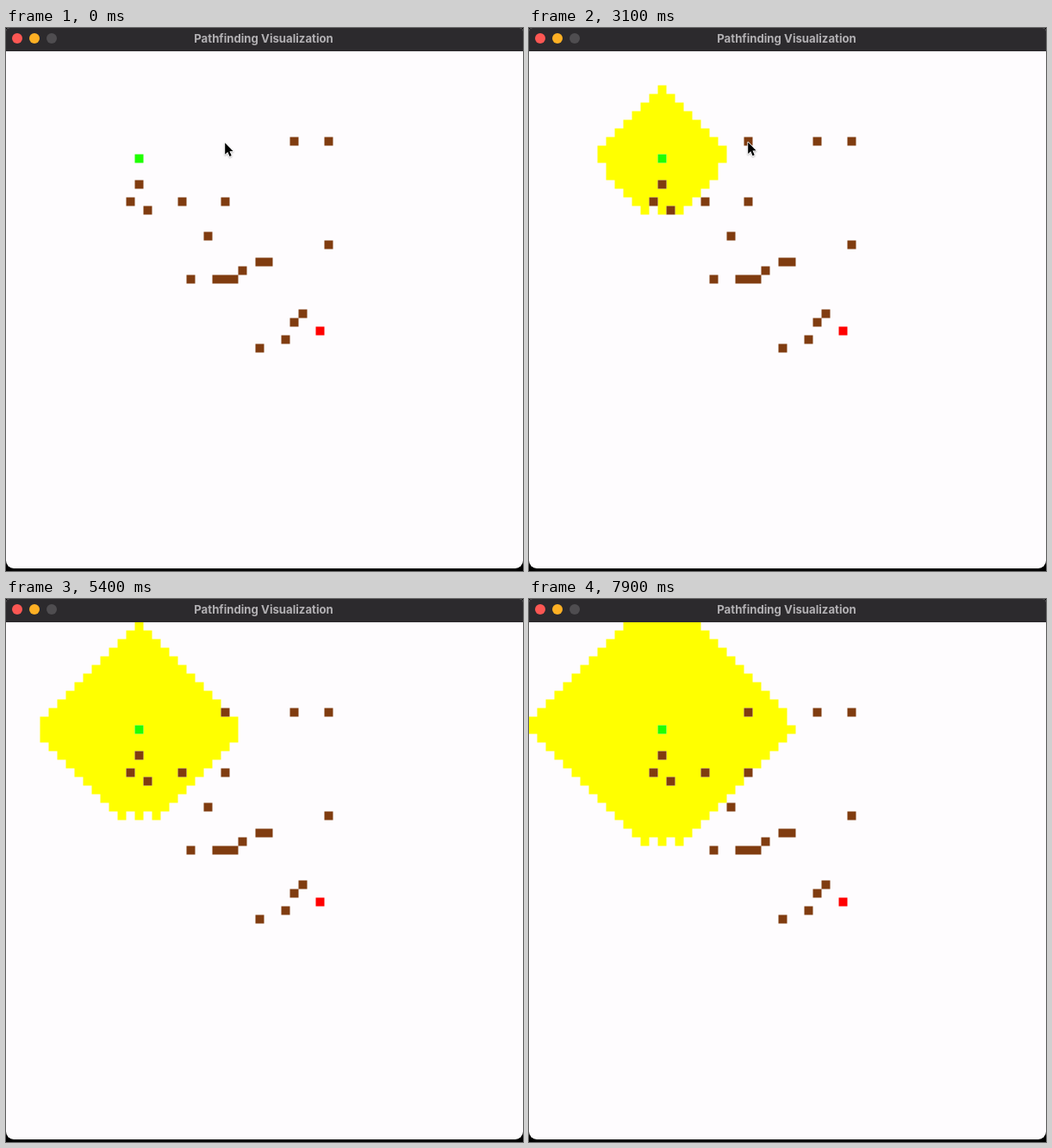
These frames come from a looping animation (600x630 px, 8000 ms). An HTML page with a canvas:

```html
<!DOCTYPE html>
<html lang="en">
<head>
<meta charset="utf-8">
<title>Pathfinding Visualization</title>
<style>
  html, body { margin: 0; width: 100%; height: 100%; overflow: hidden; background: #000; }
  .window { position: absolute; left: 0; top: 0; width: 600px; height: 627px; overflow: hidden;
            border-radius: 4px 4px 9px 9px; background: #fefcfe; }
  .bar { position: absolute; left: 0; top: 0; width: 600px; height: 27px; background: #2c2a2d; }
  .bar i { position: absolute; top: 6px; width: 12px; height: 12px; border-radius: 50%; }
  .bar b { position: absolute; left: 0; width: 598px; top: 0; text-align: center;
           font: 700 13.2px/24px Inter, Roboto, sans-serif; color: #b2b0b3; white-space: nowrap; }
  canvas { position: absolute; left: 0; top: 0; width: 600px; height: 630px; }
</style>
</head>
<body>
<div class="window">
  <canvas id="stage" width="600" height="630"></canvas>
  <div class="bar">
    <i style="left:7px;background:#fc5753"></i>
    <i style="left:27px;background:#fdb024"></i>
    <i style="left:47px;background:#4f4d50"></i>
    <b>Pathfinding Visualization</b>
  </div>
</div>
<script>
const LOOP = 8000, SIZE = 60, CELL = 10, LEFT = -0.5, TOP = 26.5;
const ctx = document.getElementById('stage').getContext('2d');

// Cells are [row, column].
const start = [12, 15], goal = [32, 36], placed = [10, 25];
const walls = [
  [10, 33], [10, 37], [15, 15], [17, 14], [17, 20], [17, 25], [18, 16], [21, 23], [22, 37],
  [24, 29], [24, 30], [25, 27], [26, 21], [26, 24], [26, 25], [26, 26],
  [30, 34], [31, 33], [33, 32], [34, 29]
];
const key = (r, c) => r * SIZE + c;

// Breadth-first search: up, down, left, right.
function search() {
  const seen = new Set([...walls, placed, start].map(([r, c]) => key(r, c)));
  const queue = [start];
  for (let i = 0; i < queue.length; i++) {
    const [r, c] = queue[i];
    for (const [dr, dc] of [[-1, 0], [1, 0], [0, -1], [0, 1]]) {
      const y = r + dr, x = c + dc;
      if (y < 0 || x < 0 || y >= SIZE || x >= SIZE || seen.has(key(y, x))) continue;
      seen.add(key(y, x));
      queue.push([y, x]);
    }
  }
  return queue;
}
const order = search();
const rank = (r, c) => order.findIndex(p => p[0] === r && p[1] === c);

// Time and the next cell waiting to be visited at that time.
const pace = [
  [1300, 1], [1700, rank(14, 13)], [3100, rank(13, 8)], [4700, rank(16, 22)],
  [5400, rank(12, 3)], [6600, rank(15, 4)], [7900, rank(11, 30)]
];
function visited(t) {
  if (t <= pace[0][0]) return 1;
  for (let i = 1; i < pace.length; i++) {
    const [t0, n0] = pace[i - 1], [t1, n1] = pace[i];
    if (t <= t1) return Math.round(n0 + (n1 - n0) * (t - t0) / (t1 - t0));
  }
  return pace[pace.length - 1][1];
}

// One path per colour, so neighbouring cells join without seams.
function fillCells(cells, color) {
  ctx.beginPath();
  for (const [r, c] of cells) ctx.rect(LEFT + c * CELL, TOP + r * CELL, CELL, CELL);
  ctx.fillStyle = color;
  ctx.fill();
}

const arrow = new Path2D('M0 0V13.4L3.1 10.5L5.3 15.6L7.5 14.7L5.3 9.7H9.4Z');
function drawArrow(x, y) {
  ctx.save();
  ctx.translate(x, y);
  ctx.lineJoin = 'round';
  ctx.shadowColor = 'rgba(0,0,0,.3)';
  ctx.shadowBlur = 2;
  ctx.shadowOffsetY = 1;
  ctx.strokeStyle = '#fff';
  ctx.lineWidth = 1.6;
  ctx.stroke(arrow);
  ctx.shadowColor = 'transparent';
  ctx.fillStyle = '#000';
  ctx.fill(arrow);
  ctx.restore();
}

const wheel = ['#2f9df0', '#22c52c', '#f6c23a', '#f58a2c', '#ee2b30', '#b45ad2'];
function drawBall(x, y, turn) {
  const R = 10.5, step = Math.PI * 2 / wheel.length;
  ctx.save();
  ctx.translate(x, y);
  ctx.rotate(turn);
  wheel.forEach((color, i) => {
    const a = -2.4 + i * step, b = a + step;
    const bend = v => [Math.cos(v - .6) * R * .55, Math.sin(v - .6) * R * .55];
    ctx.beginPath();
    ctx.moveTo(0, 0);
    ctx.quadraticCurveTo(...bend(a), Math.cos(a) * R, Math.sin(a) * R);
    ctx.arc(0, 0, R, a, b);
    ctx.quadraticCurveTo(...bend(b), 0, 0);
    ctx.fillStyle = color;
    ctx.fill();
  });
  ctx.restore();
}

function draw(now) {
  const t = Math.floor(now % LOOP / 100) * 100;
  ctx.clearRect(0, 0, 600, 630);
  fillCells(order.slice(1, visited(t)), '#ffff00');
  fillCells(t < 700 ? walls : [...walls, placed], '#803c10');
  fillCells([start], '#1eff00');
  fillCells([goal], '#ff0000');
  if (t < 3700) drawArrow(254.2, 132.6 + Math.max(0, .7 - t / 570));
  else if (t < 5100) drawBall(254.5, 133.5, (t - 4700) / 1000 * Math.PI * 2);
}

const begin = performance.now();
function tick() {
  draw(performance.now() - begin);
  requestAnimationFrame(tick);
}
tick();
</script>
</body>
</html>
```
